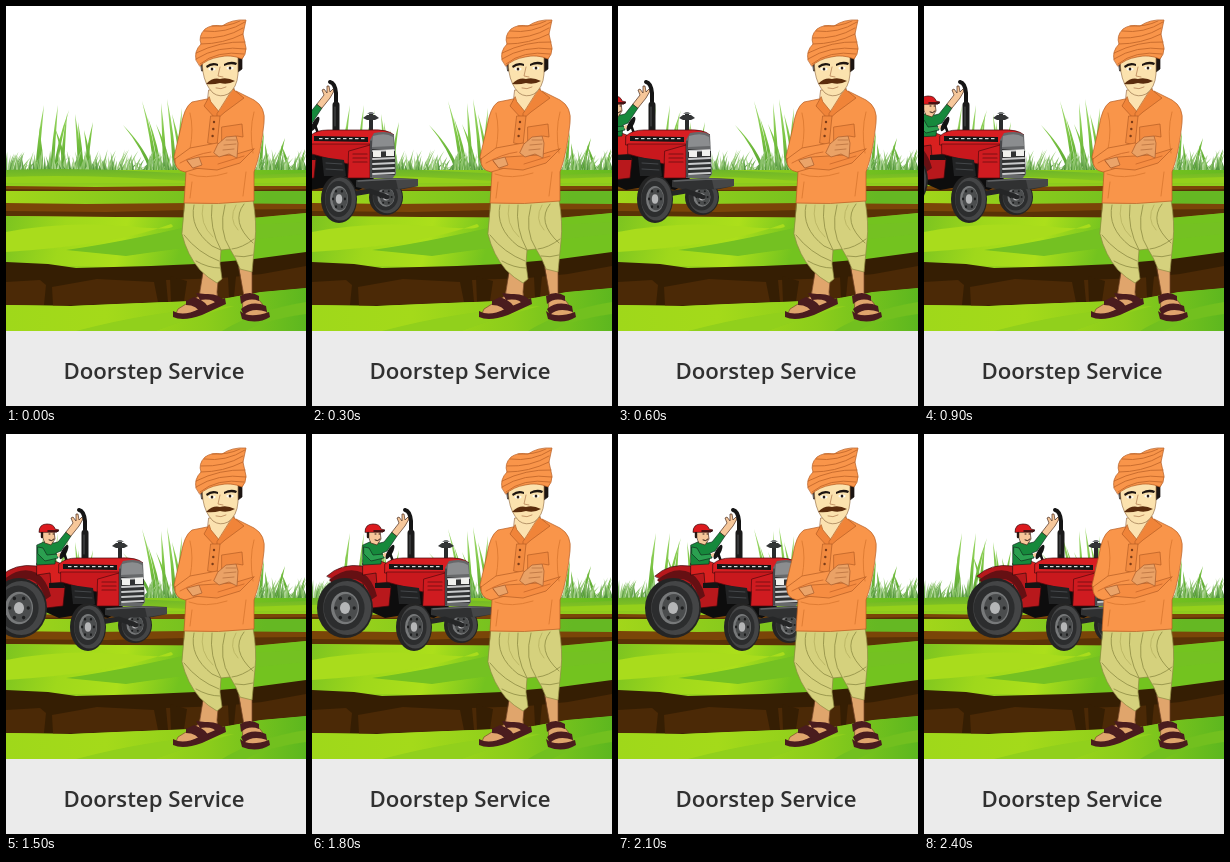
These frames come from a looping animation (300x400 px, 3 s). An HTML page with a canvas:

```html
<!DOCTYPE html>
<html lang="en">
<head>
<meta charset="utf-8">
<title>Doorstep Service</title>
<style>
  html, body { margin: 0; width: 100%; height: 100%; overflow: hidden; background: #fff; }
  canvas { display: block; width: 300px; height: 400px; }
</style>
</head>
<body>
<canvas id="stage" width="300" height="400"></canvas>
<script>
const ctx = document.getElementById('stage').getContext('2d');
const STEP = 300, LOOP = 3000;
// Exhaust pipe position at each step; the tractor is off stage at first.
const STOPS = [null, 22, 32, 40, 54, 77, 97, 119, 135];

function fill(d, color) {
  ctx.fillStyle = color;
  ctx.fill(new Path2D(d));
}
function line(d, color, width = 1) {
  ctx.strokeStyle = color;
  ctx.lineWidth = width;
  ctx.lineCap = ctx.lineJoin = 'round';
  ctx.stroke(new Path2D(d));
}
function shape(d, color, edge, width = 0.7) {
  fill(d, color);
  line(d, edge, width);
}
function oval(x, y, rx, ry, color, tilt = 0) {
  ctx.fillStyle = color;
  ctx.beginPath();
  ctx.ellipse(x, y, rx, ry, tilt, 0, Math.PI * 2);
  ctx.fill();
}
function rect(x, y, w, h, color) {
  ctx.fillStyle = color;
  ctx.fillRect(x, y, w, h);
}
function shade(x0, y0, x1, y1, ...colors) {
  const g = ctx.createLinearGradient(x0, y0, x1, y1);
  colors.forEach((c, i) => g.addColorStop(i / (colors.length - 1), c));
  return g;
}
function random(seed) {
  return () => (seed = seed * 16807 % 2147483647) / 2147483647;
}

function blade(x, y, tipX, tipY, w, color) {
  const mx = x + (tipX - x) * 0.25, my = (y + tipY) / 2;
  fill(`M${x - w} ${y}Q${mx - w} ${my} ${tipX} ${tipY}Q${mx + w} ${my} ${x + w} ${y}Z`, color);
}

function grass() {
  const rnd = random(4127);
  const tall = [
    [31, 38, 99], [36, 33, 120], [46, 52, 99], [49, 63, 104], [56, 61, 108],
    [60, 49, 122], [74, 69, 108], [76, 72, 116], [80, 87, 116], [84, 78, 124],
    [146, 117, 119], [150, 136, 95], [154, 142, 112], [159, 155, 97],
    [164, 150, 118], [169, 161, 93], [172, 176, 102], [176, 166, 108],
    [254, 258, 126], [262, 259, 137], [271, 279, 132], [283, 275, 139], [294, 299, 143]
  ];
  const green = shade(0, 95, 0, 167, '#a5dc74', '#7cc544', '#4f9c2c');
  for (const [x, tx, ty] of tall) blade(x, 167, tx, ty, 1.8, green);
  const low = ['#5c9f3c', '#7bb957', '#a3cf86', '#43882f']
    .map(c => shade(0, 142, 0, 167, '#a9d68c', c));
  for (let i = 0; i < 300; i++) {
    const x = i + rnd() * 2;
    const h = 7 + rnd() * 17;
    blade(x, 167, x + rnd() * 16 - 5, 167 - h, 1.1, low[i % 4]);
  }
}

function field() {
  rect(0, 164, 300, 161, shade(0, 0, 300, 0, '#9dd41a', '#8acb1d', '#66ba20'));
  fill('M0 164Q75 161 150 166T300 167V181H0Z', shade(0, 164, 0, 181, '#6db529', '#94cf1b'));
  fill('M0 171Q80 168 180 175L300 171V177H0Z', '#94d01b');
  fill('M0 180L90 181L180 180L300 180V184L170 186L0 184Z', '#7a4508');
  fill('M0 183L170 185L300 183V185L0 185Z', '#573106');
  fill('M0 185H300V198H0Z', shade(0, 0, 260, 0, '#a2d61a', '#83c81d', '#65b823'));
  fill('M0 197L80 198L185 197L300 198V207L252 212L100 211L0 210Z', '#7a4508');
  fill('M0 205L100 206L180 204L300 203V207L245 212L110 211L0 210Z', '#593206');
  fill('M0 210L110 211L245 212L300 207V250L170 263L0 258Z',
    shade(0, 212, 170, 260, '#7cc420', '#9fd81b', '#acdf1b', '#73c31f'));
  fill('M0 226Q60 214 130 221Q175 225 165 218Q110 239 0 246Z', '#a9dc1c');
  fill('M60 244Q110 237 176 222L300 216V228Q202 238 120 250Z', '#74c122');
  fill('M0 256L42 258L70 262L145 260L190 258L248 253L300 246V282L255 286L210 294L162 296L110 298L65 300L0 299Z', '#351e03');
  fill('M0 276L34 274L40 279L38 299L0 299ZM46 281L91 273L148 276L152 296L110 298L47 300Z', '#4b2906');
  fill('M160 274L216 272L256 268L300 260V282L255 286L210 294L162 296Z', '#4b2906');
  fill('M164 270L181 275L178 295L165 296ZM222 270L230 270L228 291L223 292Z', '#351e03');
  fill('M0 299L65 300L110 298L162 296L210 294L255 286L300 282V325H0Z',
    shade(0, 0, 300, 0, '#9fd81a', '#a4da1a', '#8ccd1b', '#5db71f'));
  fill('M70 325Q150 304 228 300Q190 310 150 325Z', '#91d01c');
  fill('M216 325Q250 304 300 296V308Q258 314 240 325Z', '#72c01f');
}

function wheel(x, y, rx, ry) {
  oval(x, y, rx, ry, '#242424');
  oval(x + rx * 0.08, y, rx * 0.86, ry * 0.9, '#444546');
  oval(x - rx * 0.03, y, rx * 0.73, ry * 0.75, '#2c2d2e');
  oval(x, y, rx * 0.5, ry * 0.54, '#77797a');
  oval(x + 1, y, rx * 0.42, ry * 0.47, '#4b4d4e');
  for (let i = 0; i < 6; i++) {
    const a = i * Math.PI / 3;
    oval(x + Math.cos(a) * rx * 0.33, y + Math.sin(a) * ry * 0.37, rx * 0.06, ry * 0.06, '#1d1e1f');
  }
  oval(x, y, rx * 0.18, ry * 0.2, '#b5b6b7');
}

function driver() {
  shape('M-46 129L-36 124L-21 130L-20 150L-32 152L-33 139L-46 141Z', '#d8201f', '#3b0c0d');
  fill('M-34 149L-20 148L-18 154L-34 154Z', '#141414');
  shape('M-46 111L-37 107L-29 109L-25 108L-17 98L-12 102L-22 117L-27 119L-28 130L-46 131Z', '#16893c', '#10301d');
  shape('M-17 98L-10 89L-12 84L-10 83L-7 87L-7 80L-5 80L-4 86L-1 83L0 85L-4 92L-12 102Z', '#f6c79a', '#4a2a1b');
  shape('M-45 113L-40 114L-36 121L-26 120L-25 124L-38 127L-45 120Z', '#2ba050', '#10301d');
  oval(-23, 121, 3, 2, '#f6c79a');
  shape('M-42 97L-29 97L-28 105L-32 111L-38 109Z', '#f6c79a', '#4a2a1b');
  line('M-41 98V103', '#241812', 2.4);
  line('M-34 100h1M-30 100h1M-34 106Q-31 108-29 105', '#2e1a12', 1);
  shape('M-44 98Q-44 90-36 90Q-29 90-28 95L-24 96L-26 98Z', '#dc1a1e', '#37090b');
  line('M-35 97L-25 97', '#1d1010', 1.5);
  oval(-19, 118, 2.6, 8, '#151515', 0.5);
  line('M-19 119L-13 136', '#111', 2.5);
}

function grille() {
  fill('M36 134L40 127Q54 124 60 129L62 168L58 173L36 172Z', '#66686a');
  fill('M39 130Q52 126 59 131L60 140L38 141Z', '#8b8d8f');
  rect(38, 143, 23, 26, '#303132');
  for (const y of [144, 152, 157, 162, 167]) line(`M39 ${y + 1}L60 ${y}`, '#c9cacb', 2);
  fill('M39 145L47 145V151H39ZM52 144L60 144V150H52Z', '#f1f1ee');
  line('M37 135L37 171', '#26272a', 1);
}

function tractor(x) {
  ctx.save();
  ctx.translate(x, 0);
  wheel(52, 191, 17, 18);
  fill('M-48 140L-10 134L36 140L40 176L25 184L0 180L-24 184L-42 176Z', '#0d0d0d');
  shape('M-82 142Q-68 129-47 132L-28 141L-18 153L-20 172L-37 174L-46 150L-71 148Z', '#b8181c', '#3b0a0c');
  fill('M-80 146Q-62 131-46 139Q-36 146-32 162L-38 166Q-42 146-56 145L-76 150Z', '#651013');
  driver();

  line('M-4 76Q1 77 2 87V126', '#151515', 4);
  line('M2 99V124', '#1b1b1b', 7);
  line('M1 101V120', '#505255', 1);
  line('M37 108V127', '#2a2b2c', 4);
  fill('M29 112L33 109H41L45 112L41 114H33Z', '#333536');
  fill('M33 108Q37 104 41 108Z', '#777a7c');

  shape('M-24 130Q-18 124-6 124L36 124Q54 123 60 129L38 133L36 139L-24 139Z', '#d91e22', '#42090c');
  fill('M-20 130L34 131V136L-20 135Z', '#151515');
  for (let i = 0; i < 8; i++) rect(-15 + i * 6, 132, 3.5, 1.2, '#d8d8d8');
  shape('M-22 138H36V145L18 152L14 158L-22 148Z', '#c9181d', '#53090d');
  shape('M15 145L36 139V172L14 172Z', '#cf1b20', '#52090c');
  line('M19 148H33M19 152H33M19 156H33', '#7d1013', 1.2);
  fill('M-12 151L10 154L12 170L-10 170Z', '#222324');
  line('M-8 157L8 158M-8 163L9 164', '#44474a', 1);
  grille();

  fill('M22 174L60 172L84 173V180L70 183L36 184L22 181Z', '#303132');
  line('M24 175L60 173L82 174', '#606264', 1.5);
  fill('M62 174L84 173V180L64 183Z', '#454647');
  line('M6 190L36 185L53 191', '#252627', 5);
  wheel(-64, 174, 28, 30);
  wheel(5, 193, 18, 24);
  ctx.restore();
}

function feet() {
  const skin = '#e0a56c', edge = '#7a4a2c', sandal = '#4a1c1e';
  shape('M198 262L213 264L211 286Q214 299 198 302L176 311Q168 309 172 303L193 290Z', skin, edge);
  fill('M167 305Q177 311 193 303L219 292L220 298L196 309Q177 316 167 311Z', sandal);
  fill('M180 295L188 291Q202 296 203 304L195 308Q191 299 180 299Z', sandal);
  fill('M190 287L199 288Q213 287 218 295L211 299Q208 292 194 294Z', sandal);
  shape('M233 261L246 261L246 287Q257 296 262 309Q259 315 240 312Q234 304 238 291Z', skin, edge);
  fill('M234 305Q243 313 263 306L264 311Q251 319 236 313Z', sandal);
  fill('M235 303Q246 294 260 300L261 306Q246 301 238 309Z', sandal);
  fill('M234 290Q244 284 253 290L253 295Q243 291 235 298Z', sandal);
}

function dhoti() {
  shape('M179 196L247 194Q251 217 249 235L246 266L234 263Q230 252 224 243L215 244L214 258L216 273L211 277Q202 272 194 264Q181 249 176 228Z', '#d5d17d', '#8d8a42');
  line('M188 199Q183 222 206 240L215 244M206 199Q203 222 215 244M219 199Q212 225 224 243M238 198Q224 216 247 237M178 229Q192 247 213 255M190 255Q202 262 214 262M226 243Q236 242 248 233M229 250Q238 252 247 249', '#96934a', 0.9);
  line('M197 199Q193 218 207 231M230 199Q222 213 232 224', '#b6b260', 0.8);
}

function shirt() {
  const edge = '#b55e25', cloth = '#f9954a';
  shape('M203 84L228 82L230 93L212 114L201 101Z', '#fbe2b0', '#9c6a40');
  shape('M201 93L186 96Q178 101 175 121L168 151Q169 163 180 166L178 197Q212 199 248 195L248 166Q255 147 258 117Q260 101 248 94L230 85L212 109Z', cloth, edge);
  shape('M203 91L198 100L210 113L214 107L205 96Z', '#f08439', edge);
  shape('M227 83L238 92L219 106L211 113L211 108Z', '#f08439', edge);
  shape('M205 110L214 110L211 139L202 137Z', '#f28b40', edge);
  for (let y = 116; y < 134; y += 7) oval(208 - (y - 116) / 10, y, 1.2, 1.3, '#7a3c18');
  shape('M216 121L236 118L237 131L231 130L216 135Z', '#f28a40', edge);
  line('M184 107Q188 123 184 143M248 106Q243 125 247 147M183 168Q199 174 221 167M240 166L237 190M186 176L184 192', '#d9772f', 0.8);
  shape('M169 153L184 142L211 137L231 145L230 155L203 159L179 166Q168 164 169 153Z', cloth, edge);
  shape('M248 143L234 157L211 164L187 162L181 155L194 151L227 149Z', '#f68d42', edge);
  shape('M212 138L220 131L230 130L232 137L231 152L223 148L213 151L208 147Z', '#eaa266', '#a65e30');
  line('M220 134L230 134M218 139L230 138M217 144L228 143', '#b06a3a', 0.7);
  shape('M181 154L193 151L196 159L187 162Z', '#eba469', '#a65e30');
  line('M174 157Q190 148 205 146M212 158L238 150', '#c9682a', 0.8);
}

function head() {
  shape('M194 52L201 50L199 65L196 65ZM231 50L236 48L236 63L232 66Z', '#1c1512', '#1c1512');
  shape('M196 52L232 48L232 68Q231 82 222 88Q214 92 207 87Q199 79 197 66Z', '#fbe2ae', '#9a744c');
  fill('M200 60Q206 55 212 58L212 60Q206 58 201 62ZM218 58Q225 54 231 57L230 59Q224 57 218 60Z', '#1f1611');
  oval(206, 63, 3.5, 1.5, '#fffdf4');
  oval(224, 62, 3.5, 1.5, '#fffdf4');
  oval(206, 63, 1.3, 1.5, '#281c18');
  oval(224, 62, 1.3, 1.5, '#281c18');
  line('M214 61L212 70L217 71M210 82Q215 84 220 81', '#b78357', 0.8);
  fill('M214 73Q207 71 200 78Q207 79 214 77Q222 79 229 75Q221 71 214 73Z', '#5a2c0d');
  shape('M190 54Q188 45 195 38Q192 30 199 23Q206 18 216 20Q226 13 240 14L237 28L240 42Q240 49 236 53Q225 48 213 51Q201 53 194 60Z', '#f9954a', '#b55e25');
  line('M198 25Q220 28 239 16M195 32Q219 33 237 22M195 38Q217 38 237 28M190 47Q214 35 239 36M190 53Q212 39 240 43M194 58Q211 44 238 48M206 20Q222 21 234 15', '#c4692c', 0.9);
}

function caption() {
  rect(0, 325, 300, 75, '#ebebeb');
  ctx.fillStyle = '#303030';
  ctx.font = '600 22.2px "Open Sans", "Noto Sans", sans-serif';
  ctx.textAlign = 'center';
  ctx.fillText('Doorstep Service', 148, 373);
}

function draw(t) {
  const x = STOPS[Math.min(Math.floor(t / STEP), STOPS.length - 1)];
  rect(0, 0, 300, 400, '#fff');
  grass();
  field();
  if (x !== null) tractor(x);
  feet();
  dhoti();
  shirt();
  head();
  caption();
}

const start = performance.now();
function tick() {
  draw((performance.now() - start) % LOOP);
  requestAnimationFrame(tick);
}
tick();
</script>
</body>
</html>
```
